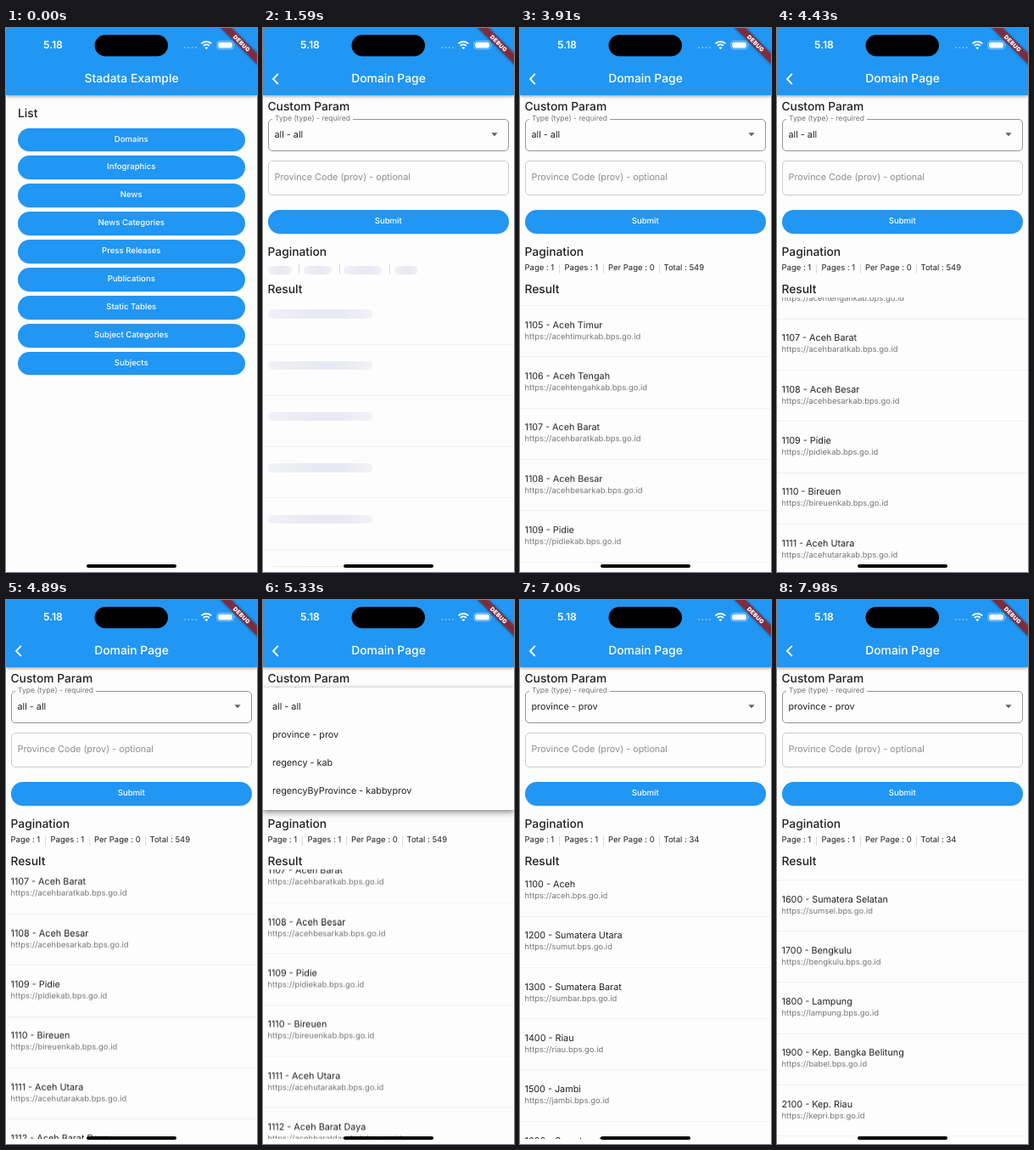
An HTML page for the animation above (8 s loop, 296 by 640 pixels).

```html
<!DOCTYPE html>
<html lang="en">
<head>
<meta charset="utf-8">
<title>Stadata Example</title>
<style>
  html, body { margin: 0; width: 100%; height: 100%; overflow: hidden; background: #fdfdfd; }
  #stage {
    position: relative; width: 296px; height: 640px; overflow: hidden;
    font: 400 10.8px/20px Inter, "Open Sans", sans-serif; color: #212121;
    text-rendering: geometricPrecision;
  }
  #stage div, #stage span, #stage svg { position: absolute; box-sizing: border-box; }
  #stage span { white-space: pre; margin-top: -10px; }
  .page { inset: 0; background: #fdfdfd; }
  .bar {
    left: 0; top: 0; width: 296px; height: 79px; background: #2196f3;
    box-shadow: 0 1px 3px rgba(0, 0, 0, .3), 0 2px 5px rgba(0, 0, 0, .15);
  }
  #stage .title { left: 0; width: 296px; top: 60px; text-align: center; color: #fff; font-size: 13.9px; font-weight: 500; }
  .head { font-size: 13.8px; font-weight: 500; }
  .btn {
    height: 27.4px; border-radius: 14px; background: #2196f3; color: #fff;
    font-size: 9.6px; font-weight: 500; line-height: 27.4px; text-align: center;
    box-shadow: 0 1px 1px rgba(0, 0, 0, .12);
  }
  .field { left: 5.5px; width: 284.5px; border: 1px solid #949494; border-radius: 5px; }
  #stage .label {
    left: 11px; top: 107px; margin-top: -5px; padding: 0 3px;
    font-size: 8.55px; line-height: 10px; color: #757575; background: #fdfdfd;
  }
  #form { inset: 0; }
  .focus .field:first-child { border: 2px solid #2196f3; }
  #stage .focus .label { color: #2196f3; }
  #menu {
    left: 0; top: 13px; width: 296px; height: 144px; background: #fdfdfd;
    box-shadow: 0 3px 8px rgba(0, 0, 0, .38), 0 1px 4px rgba(0, 0, 0, .18);
  }
  #menuClip { left: 0; top: 90px; width: 296px; height: 172px; }
  .info { font-size: 9.5px; }
  .sep { width: 1px; top: 278px; height: 11px; background: #dadada; }
  .view { left: 0; top: 316.5px; width: 296px; height: 317.5px; overflow: hidden; }
  .list { left: 0; top: 0; width: 296px; will-change: transform; }
  .url { font-size: 9.42px; color: #757575; }
  .rule { left: 0; width: 296px; height: 1px; background: #f1f1f1; }
  .pill { height: 10.5px; border-radius: 5px; background: linear-gradient(90deg, #f1f1f7, #e9e9f3 45%, #e9e9f3 70%, #f2f2f7); }
</style>
</head>
<body>
<div id="stage">
  <div class="page" id="home">
    <div class="bar"><span class="title">Stadata Example</span></div>
    <span class="head" style="left:14px;top:101px">List</span>
  </div>

  <div class="page" id="domain">
    <div class="bar">
      <span class="title">Domain Page</span>
      <svg width="30" height="79"><path d="M17.8 53.8 12 60l5.8 6.2" fill="none" stroke="#fff" stroke-width="1.9"/></svg>
    </div>
    <span class="head" style="left:5.5px;top:93px">Custom Param</span>
    <div id="form">
      <div class="field" style="top:106.5px;height:38.5px"></div>
      <span class="label">Type (type) - required</span>
      <span id="value" style="left:13.5px;top:125.5px"></span>
      <svg style="left:269px;top:123px" width="8" height="5"><path d="M.3.3h7.4L4 4.2z" fill="#616161"/></svg>
      <div class="field" style="top:155.5px;height:41px;border-color:#ccc"></div>
      <span style="left:13.5px;top:176px;color:#8d8d8d">Province Code (prov) - optional</span>
      <div class="btn" style="left:5.5px;top:214.3px;width:284.5px">Submit</div>
    </div>
    <span class="head" style="left:5.5px;top:264px">Pagination</span>
    <span class="head" style="left:5.5px;top:308px">Result</span>
    <div id="loaded">
      <span class="info" style="left:5.5px;top:283px">Page : 1</span>
      <span class="info" style="left:52.5px;top:283px">Pages : 1</span>
      <span class="info" style="left:104px;top:283px">Per Page : 0</span>
      <span class="info" id="total" style="left:169.5px;top:283px"></span>
      <div class="sep" style="left:46px"></div>
      <div class="sep" style="left:98px"></div>
      <div class="sep" style="left:163.5px"></div>
      <div class="view"><div class="list" id="regions"></div><div class="list" id="provinces"></div></div>
    </div>
    <div id="skeleton">
      <div class="sep" style="left:41.5px"></div>
      <div class="sep" style="left:89.5px"></div>
      <div class="sep" style="left:148.5px"></div>
      <div class="view"><div class="list" id="bones"></div></div>
    </div>
    <div id="menuClip"><div id="menu"></div></div>
  </div>

  <span style="left:44px;top:20px;font-size:12.2px;font-weight:600;color:#fff">5.18</span>
  <svg width="296" height="60" style="left:0;top:0">
    <rect x="104.5" y="8" width="86.5" height="25.2" rx="12.6"/>
    <g fill="#fff" fill-opacity=".4">
      <circle cx="211" cy="23" r="1.1"/><circle cx="215.3" cy="23" r="1.1"/><circle cx="219.6" cy="23" r="1.1"/><circle cx="223.9" cy="23" r="1.1"/>
    </g>
    <path d="M230.4 18.4a8.4 8.4 0 0 1 11.8 0M232.8 21a5 5 0 0 1 7 0" fill="none" stroke="#fff" stroke-width="1.9"/>
    <path d="M236.3 25.2l-2-2.1a2.9 2.9 0 0 1 4 0z" fill="#fff"/>
    <rect x="248.8" y="15.3" width="19.4" height="9.6" rx="3" fill="none" stroke="#fff" stroke-opacity=".5" stroke-width=".9"/>
    <rect x="250.2" y="16.7" width="16.6" height="6.8" rx="1.8" fill="#fff"/>
    <path d="M269.4 18.6q1.6 1.5 0 3z" fill="#fff" fill-opacity=".6"/>
    <g transform="translate(296 0) rotate(45)">
      <rect x="-34" y="21.1" width="68" height="9" fill-opacity=".5" style="filter:blur(1.5px)"/>
      <rect x="-30.1" y="21.1" width="60.2" height="9" fill="#b71c1c" fill-opacity=".63"/>
      <text y="28" text-anchor="middle" font-size="6.8" font-weight="900" fill="#fff" letter-spacing=".3">DEBUG</text>
    </g>
  </svg>
  <div style="left:95px;top:631px;width:105.5px;height:4px;border-radius:2px;background:#000"></div>
</div>

<script>
const $ = id => document.getElementById(id);
const LOOP = 8000, ROW = 60.3;

const add = (parent, tag, cls, css, text = '') => {
  const el = document.createElement(tag);
  el.className = cls;
  el.style.cssText = css;
  el.textContent = text;
  parent.append(el);
};

['Domains', 'Infographics', 'News', 'News Categories', 'Press Releases', 'Publications',
  'Static Tables', 'Subject Categories', 'Subjects'].forEach((name, i) =>
  add($('home'), 'div', 'btn', `left:14px;width:267.5px;top:${117.5 + i * 32.95}px`, name));

['all - all', 'province - prov', 'regency - kab', 'regencyByProvince - kabbyprov'].forEach((name, i) =>
  add($('menu'), 'span', '', `left:11px;top:${23 + i * 33}px`, name));

const addRow = (list, i, code, name, host) => {
  const y = i * ROW;
  add(list, 'span', '', `left:5.5px;top:${y + 18}px`, `${code} - ${name}`);
  add(list, 'span', 'url', `left:5.5px;top:${y + 32}px`, `https://${host}.bps.go.id`);
  add(list, 'div', 'rule', `top:${y + 54.5}px`);
};

addRow($('regions'), 0, '0000', 'Pusat', 'www');
addRow($('regions'), 1, '1100', 'Aceh', 'aceh');
['Simeulue', 'Aceh Singkil', 'Aceh Selatan', 'Aceh Tenggara', 'Aceh Timur', 'Aceh Tengah',
  'Aceh Barat', 'Aceh Besar', 'Pidie', 'Bireuen', 'Aceh Utara', 'Aceh Barat Daya',
  'Gayo Lues', 'Aceh Tamiang'].forEach((name, i) =>
  addRow($('regions'), i + 2, 1101 + i, name, name.toLowerCase().replaceAll(' ', '') + 'kab'));

['1100 Aceh|aceh', '1200 Sumatera Utara|sumut', '1300 Sumatera Barat|sumbar', '1400 Riau|riau',
  '1500 Jambi|jambi', '1600 Sumatera Selatan|sumsel', '1700 Bengkulu|bengkulu', '1800 Lampung|lampung',
  '1900 Kep. Bangka Belitung|babel', '2100 Kep. Riau|kepri', '3100 DKI Jakarta|jakarta'].forEach((item, i) => {
  const [label, host] = item.split('|');
  addRow($('provinces'), i, label.slice(0, 4), label.slice(5), host);
});

[[5.5, 28], [48, 33], [95, 46], [155, 28]].forEach(([x, w]) =>
  add($('skeleton'), 'div', 'pill', `left:${x}px;top:279.5px;width:${w}px`));
for (let i = 0; i < 6; i++) {
  add($('bones'), 'div', 'pill', `left:5.5px;top:${i * ROW + 14.3}px;width:123px`);
  add($('bones'), 'div', 'rule', `top:${i * ROW + 54.5}px`);
}

// The screen refreshes in bursts: [first, last, count]
const BURSTS = [[1260, 1590, 4], [1850, 2070, 3], [3270, 3710, 5], [3910, 3910, 1], [4100, 4890, 8],
  [4990, 5770, 8], [5880, 6670, 8], [6790, 7000, 3], [7640, 7980, 4]];

const refreshTime = t => {
  const burst = BURSTS.findLast(b => b[0] <= t);
  if (!burst) return 0;
  const [first, last, count] = burst;
  if (t >= last) return last;
  const step = (last - first) / (count - 1);
  // Refreshes land on 10 ms ticks, so allow for rounding
  return first + Math.floor((t - first + 9) / step) * step;
};

const clamp = v => Math.min(1, Math.max(0, v));
const ramp = (t, from, to) => clamp((t - from) / (to - from));
const easeOut = p => 1 - (1 - p) ** 3;
const fling = (t, start, distance) => distance * (1 - Math.exp(-Math.max(0, t - start) / 500));
const show = (id, on) => { $(id).style.display = on ? '' : 'none'; };
const move = (id, x, y) => { $(id).style.transform = `translate(${x}px, ${y}px)`; };

function draw(t) {
  const slide = easeOut(ramp(t, 1230, 1580));
  move('home', -slide * 296 / 3, 0);
  move('domain', (1 - slide) * 296, 0);
  show('domain', slide > 0);
  $('domain').style.boxShadow = slide < 1 ? '0 0 10px rgba(0, 0, 0, .15)' : 'none';

  const busy = t < 1850 || (t >= 6320 && t < 6660);
  const second = t >= 6320;
  show('skeleton', busy);
  show('loaded', !busy);
  show('regions', !second);
  show('provinces', second);
  $('total').textContent = 'Total : ' + (second ? 34 : 549);
  move('regions', 0, -fling(t, 3336, 508));
  move('provinces', 0, -fling(t, 7650, 588));

  $('value').textContent = t >= 5600 ? 'province - prov' : 'all - all';
  $('form').className = t >= 5600 && t < 6320 ? 'focus' : '';

  // The menu unfolds from its first item, then fades away
  const grow = easeOut(ramp(t, 5050, 5320));
  const fade = ramp(t, 5000, 5120) * (1 - ramp(t, 5600, 5760));
  const menu = $('menuClip');
  show('menuClip', fade > 0);
  menu.style.opacity = fade;
  menu.style.clipPath = `inset(${17 * (1 - grow)}px 0 ${118 * (1 - grow)}px)`;
}

const origin = performance.now();
const tick = () => {
  draw(refreshTime((performance.now() - origin) % LOOP));
  requestAnimationFrame(tick);
};
tick();
</script>
</body>
</html>
```
